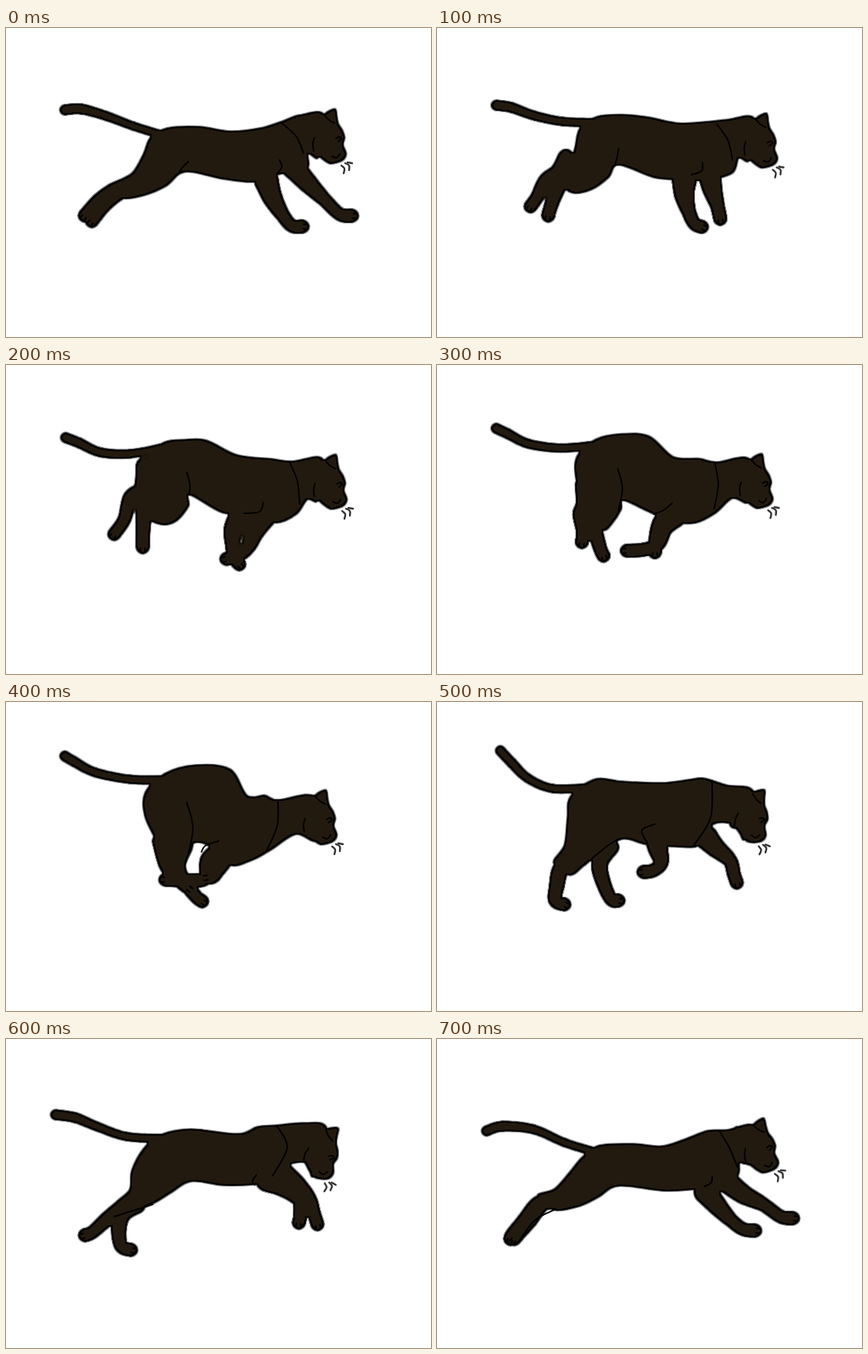
Recreate the animation shown at these times as an HTML page. Size 550 by 400 pixels, loop 800 ms.

```html
<!DOCTYPE html>
<html lang="en">
<head>
<meta charset="utf-8">
<title>Running panther</title>
<style>
html, body { margin: 0; width: 100%; height: 100%; overflow: hidden; background: #fff; }
svg { display: block; width: 550px; height: 400px; }
path { stroke-linecap: round; stroke-linejoin: round; }
#shape { fill: #858585; stroke: #858585; stroke-width: 3.4; }
#lines, #whiskers { fill: none; stroke: #000; stroke-width: 1.9; }
#whiskers { stroke: #333; stroke-width: 2.4; }
</style>
</head>
<body>
<svg viewBox="0 0 550 400">
  <filter id="ink" filterUnits="userSpaceOnUse" x="0" y="0" width="550" height="400" color-interpolation-filters="sRGB">
    <feMorphology in="SourceAlpha" operator="erode" radius="1" result="edge"/>
    <feMorphology in="SourceAlpha" operator="erode" radius="3" result="core"/>
    <feFlood flood-color="#231a0f"/>
    <feComposite in2="core" operator="in" result="fur"/>
    <feMerge>
      <feMergeNode in="SourceGraphic"/><feMergeNode in="edge"/><feMergeNode in="fur"/>
    </feMerge>
  </filter>
  <g filter="url(#ink)"><g id="shape"></g></g>
  <g id="lines"></g>
  <g id="whiskers"></g>
</svg>
<script>
const points = s => s.split(' ').map(p => p.split(',').map(Number));

// Head around its eye; each pose only places and turns it
const HEAD = points('-45,-25 -31,-28 -20,-30 -14,-34 -5,-37 -3,-27 -1,-18 4,-10 7,0 5,9 9,20 6,28 -3,32 -13,33 -21,28 -30,20 -40,15');
const FACE = ['-19,-29 -13,-23 -6,-19', '-32,0 -34,8 -33,17', '-4,1 0,-1 3,1 -1,5', '-9,24 -3,26 1,21'].map(points);
const WHISKERS = ['3,36 7,40 6,46', '8,33 13,36 13,42', '11,32 17,33'].map(points);

// Limb radii from the joint at the body to the tip
const TAIL = [5, 5, 5.5, 6, 6], HIND = [10, 10, 9, 8, 8], FORE = [15, 12, 8.5, 8, 8];

// legs: near hind, far hind, near fore, far fore; lines: neck, elbow, thigh
const pose = (head, tail, body, legs, lines) =>
  ({ head, tail: points(tail), body: points(body), legs: legs.map(points), lines: lines.map(points) });

const stretch = pose([431, 142, 0],
  '200,138 165,127 130,114 98,105 76,106',
  '187,142 208,130 250,128 290,134 328,130 357,121 380,113 412,113 405,166 391,163 389,182 354,189 320,199 280,195 232,186 208,204 180,216 150,220 138,203 163,188 178,163',
  ['160,205 145,213 128,228 115,245 111,250', '155,205 138,212 120,224 106,238 102,243',
   '370,178 390,200 412,222 432,241 448,243', '337,198 345,220 358,242 370,256 384,257'],
  ['357,123 376,141 385,162', '354,171 357,180 351,188', '236,173 228,181 222,190']);

const gather = pose([432, 153, 0],
  '203,107 160,115 122,113 95,101 77,94',
  '183,118 205,100 232,97 260,98 300,117 345,122 370,125 410,122 404,174 390,174 376,193 350,204 320,194 280,191 238,168 236,183 220,202 200,206 184,196 182,165 180,145',
  ['190,165 179,180 178,202 177,225 177,236', '179,130 176,160 161,172 153,200 140,219',
   '335,195 322,215 313,236 300,247 285,251', '303,198 295,212 293,232 296,250 302,258'],
  ['367,126 377,150 380,180', '333,178 328,190 308,192', '234,139 238,155 237,168']);

const tuck = pose([419, 151, 0],
  '203,101 160,100 115,91 88,77 76,70',
  '180,118 205,93 245,82 290,87 312,121 335,121 352,127 400,123 402,178 375,171 345,190 320,204 290,211 262,186 244,182 240,192 232,210 232,222 210,220 197,185 180,148',
  ['222,190 219,212 233,235 246,252 254,258', '200,180 205,200 210,215 225,232 235,240',
   '280,195 264,205 258,228 235,231 206,230', '310,190 288,198 274,218 268,226 262,227'],
  ['352,127 351,160 337,193', '275,180 258,186 253,194', '234,130 242,165 232,210']);

const step = pose([421, 151, 12],
  '195,111 150,112 118,99 97,79 82,63',
  '173,122 205,100 240,103 290,105 325,101 345,99 375,108 410,117 398,177 386,159 358,158 340,185 310,187 270,184 240,177 212,194 190,212 172,224 151,208 165,185 169,150',
  ['175,205 160,217 155,238 153,257 165,262', '225,188 211,208 214,230 225,255 235,257',
   '283,172 286,190 290,208 280,218 267,220', '348,175 360,188 379,205 384,222 388,234'],
  ['356,102 354,150 332,186', '282,158 265,166 272,182', '238,177 225,183 200,203']);

const leap = pose([422, 152, 20],
  '200,129 155,126 117,113 90,102 64,98',
  '178,142 200,124 240,117 300,123 325,114 350,112 385,109 415,116 398,177 388,160 363,164 355,182 322,188 280,189 240,184 215,198 190,213 155,226 140,215 160,195 163,170',
  ['165,208 148,220 130,234 112,250 102,254', '170,215 152,226 146,245 149,268 162,273',
   '338,182 360,192 379,208 381,226 379,238', '358,175 375,188 392,206 398,224 403,240'],
  ['350,112 364,140 345,177', '324,176 319,184 322,189', '190,214 165,222 140,230']);

const reach = pose([431, 139, -5],
  '203,146 165,134 125,117 85,113 64,119',
  '188,153 210,138 255,136 290,139 320,130 350,119 375,118 410,113 408,160 392,160 388,178 355,190 325,195 290,196 235,190 210,204 185,216 152,221 130,203 152,194 172,172',
  ['155,210 137,212 120,235 106,252 100,259', '150,207 130,215 113,235 98,252 95,259',
   '370,180 395,200 422,214 445,230 461,232', '348,198 362,215 380,234 396,246 412,248'],
  ['366,120 378,140 389,166', '356,178 355,186 346,191', '152,221 126,235 104,265']);

// Halfway between two values, lists or poses
function between(a, b) {
  if (typeof a === 'number') return (a + b) / 2;
  if (Array.isArray(a)) return a.map((v, i) => between(v, b[i]));
  return Object.fromEntries(Object.keys(a).map(k => [k, between(a[k], b[k])]));
}

// Cubic pieces through the points: start, two handles, end
function pieces(pts, closed) {
  const n = pts.length;
  const get = i => closed ? pts[(i + n) % n] : pts[Math.max(0, Math.min(n - 1, i))];
  return Array.from({ length: closed ? n : n - 1 }, (_, i) => {
    const [a, b, c, d] = [-1, 0, 1, 2].map(k => get(i + k));
    return [b, b.map((v, k) => v + (c[k] - a[k]) / 6), c.map((v, k) => v - (d[k] - b[k]) / 6), c];
  });
}

const curve = (pts, closed) =>
  `<path d="M${pts[0]}${pieces(pts, closed).map(p => 'C' + p.slice(1).join(' ')).join('')}${closed ? 'Z' : ''}"/>`;

// A tapered limb swept by a disc
function limb(joints, radii) {
  const steps = 14;
  return pieces(joints).map(([a, b, c, d], i) => Array.from({ length: steps + 1 }, (_, k) => {
    const t = k / steps, u = 1 - t;
    const [x, y] = [0, 1].map(j => u * u * u * a[j] + 3 * u * u * t * b[j] + 3 * u * t * t * c[j] + t * t * t * d[j]);
    return `<circle cx="${x}" cy="${y}" r="${u * radii[i] + t * radii[i + 1]}"/>`;
  }).join('')).join('');
}

// Two short toe lines along the end of a leg
function toes(leg) {
  const [[ax, ay], [bx, by]] = leg.slice(-2);
  const len = Math.hypot(bx - ax, by - ay), dx = (bx - ax) / len, dy = (by - ay) / len;
  return [-3, 3].map(s => curve([1, 6].map(f => [bx + f * dx - s * dy, by + f * dy + s * dx]))).join('');
}

function render({ head: [x, y, angle], tail, body, legs, lines }) {
  const onHead = s => `<g transform="translate(${x} ${y}) rotate(${angle})">${s}</g>`;
  const strokes = list => list.map(l => curve(l)).join('');
  return {
    shape: limb(tail, TAIL) + curve(body, true) + onHead(curve(HEAD, true)) +
      legs.map((leg, i) => limb(leg, i < 2 ? HIND : FORE)).join(''),
    lines: strokes(lines) + legs.map(toes).join('') + onHead(strokes(FACE)),
    whiskers: onHead(strokes(WHISKERS))
  };
}

const cycle = [stretch, between(stretch, gather), gather, between(gather, tuck), tuck, step, leap, reach].map(render);

let start, shown;
function tick(now) {
  start ??= now;
  const drawing = cycle[Math.floor((now - start) / 100) % cycle.length];
  if (drawing !== shown) {
    shown = drawing;
    for (const id in drawing) document.getElementById(id).innerHTML = drawing[id];
  }
  requestAnimationFrame(tick);
}
tick(performance.now());
</script>
</body>
</html>
```
